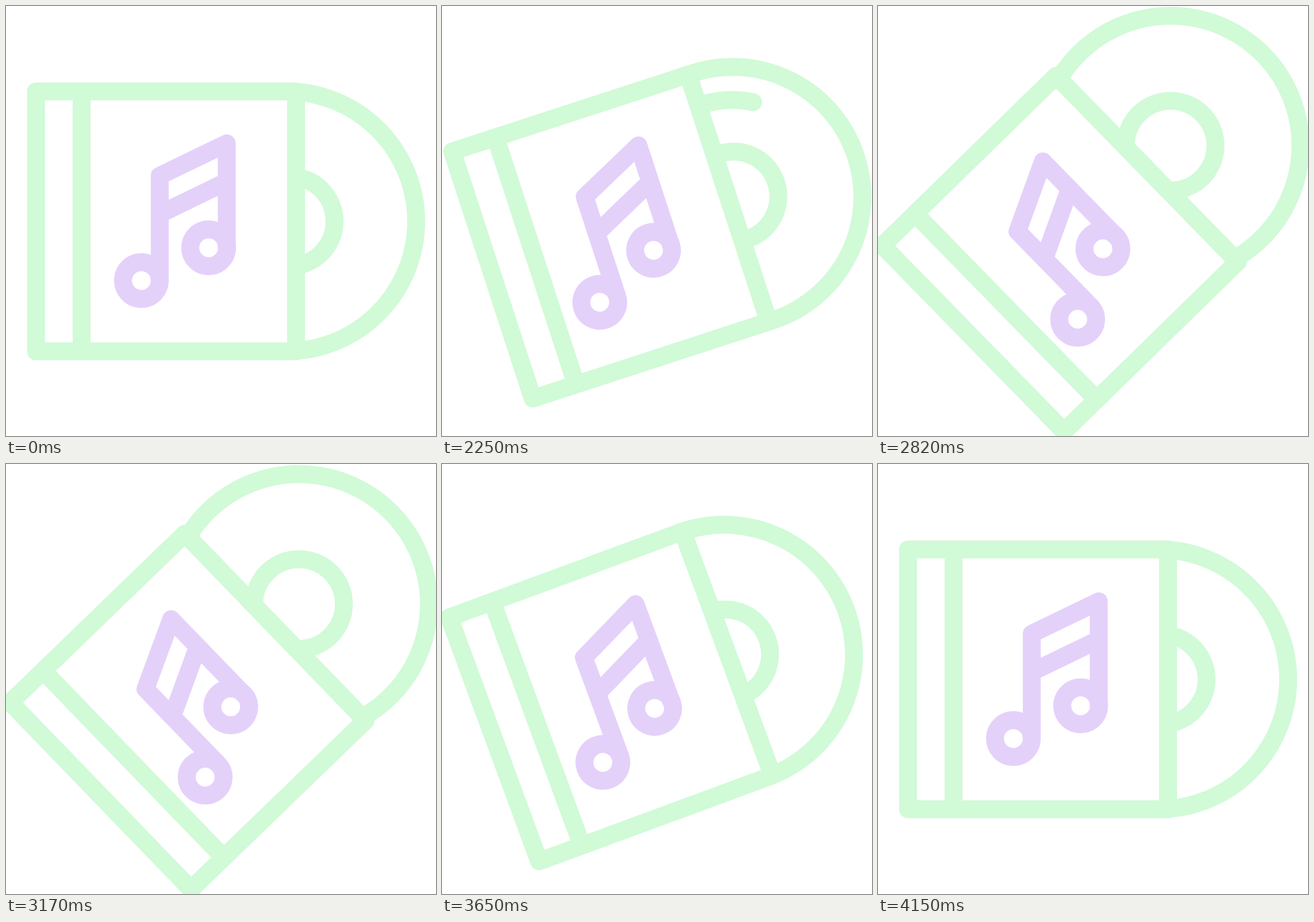
Write an HTML page that moves like this. It is 748x748 px and loops after 4.17 s.

```html
<!DOCTYPE html>
<html>
<head>
<meta charset="utf-8">
<style>
  html, body { margin: 0; height: 100%; overflow: hidden; background: #fff; }
  svg { display: block; width: 100%; height: 100%; }
  g { fill: none; stroke-width: 31.2; stroke-linecap: round; stroke-linejoin: round; }
  .green { stroke: #d1fad7; }
  .purple { stroke: #e4d1fa; }
</style>
</head>
<body>
<svg viewBox="0 0 748 748">
  <g id="icon">
    <g class="green">
      <g id="disc">
        <circle r="226"/>
        <circle id="hub" r="78"/>
        <path id="shine" d="M153 -70.7A168.5 168.5 0 0 1 153 70.7"/>
      </g>
      <path id="sleeve" fill="#fff"/>
    </g>
    <g class="purple">
      <circle cx="235.5" cy="477.6" r="32"/>
      <circle cx="352.5" cy="420.6" r="32"/>
      <path d="M267.5 477.6V295.2L384 239V420.6M267.5 362L384 305.5"/>
    </g>
  </g>
</svg>
<script>
const LOOP = 4170, START = 2000, OUT = 1000, BACK = 1150;
const [icon, disc, hub, shine, sleeve] =
  ['icon', 'disc', 'hub', 'shine', 'sleeve'].map(id => document.getElementById(id));

// cubic-bezier(x1, 0, x2, 1)
function ease(x, x1, x2) {
  if (x <= 0) return 0;
  if (x >= 1) return 1;
  let lo = 0, hi = 1, u;
  for (let i = 0; i < 24; i++) {
    u = (lo + hi) / 2;
    const v = 1 - u;
    if (3 * u * v * v * x1 + 3 * u * u * v * x2 + u ** 3 < x) lo = u; else hi = u;
  }
  return u * u * (3 - 2 * u);
}

const smooth = x => ease(x, 1 / 3, 2 / 3);

function draw(now) {
  const t = now % LOOP - START;
  // rises to 1 on the way out, falls to 0 on the way back
  const swing = (out, x1, x2) =>
    ease(t / OUT, 1 / 3, out) - ease((t - OUT) / BACK, x1, x2);

  const tilt = 45 * swing(.095, .635, .484);
  const slide = 76 * swing(.19, .736, .06);
  const spin = 160 + 360 * swing(.19, .78, .047);
  const squeeze = smooth(t / 400) - smooth((t - 1420) / 590);
  const left = 52.2 + 30 * squeeze;

  icon.setAttribute('transform', `rotate(${-tilt} 374 374)`);
  disc.setAttribute('transform', `translate(${487.5 + slide} 374.6)`);
  hub.setAttribute('cx', 6 * (1 - squeeze));
  shine.setAttribute('transform', `rotate(${spin})`);
  sleeve.setAttribute('d',
    `M504.5 148.6H${left}V600.7H504.5ZM${left + 79.3} 148.6V600.7`);
}

const begin = performance.now();
function tick() {
  draw(performance.now() - begin);
  requestAnimationFrame(tick);
}
tick();
</script>
</body>
</html>
```
